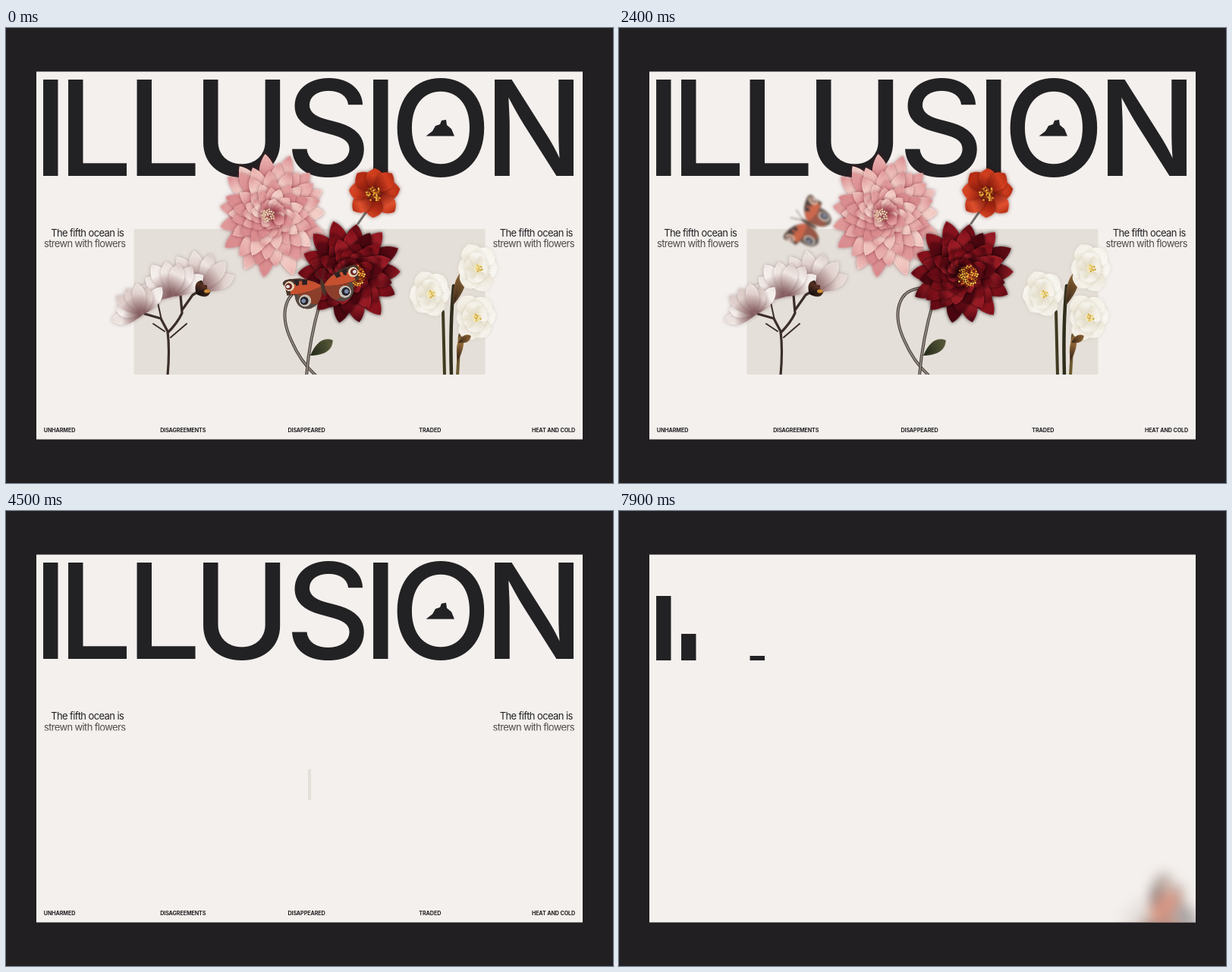
Write an HTML page with a canvas that moves like this. It is 800 px wide and 600 px high and loops after 8 s.

```html
<!DOCTYPE html>
<html lang="en">
<head>
<meta charset="utf-8">
<title>Illusion</title>
<style>
html, body { margin: 0; width: 100%; height: 100%; overflow: hidden; background: #221f22; }
canvas { display: block; }
</style>
</head>
<body>
<canvas id="stage" width="800" height="600" aria-label="ILLUSION. The fifth ocean is strewn with flowers"></canvas>
<script>
const LOOP = 8000, INK = '#222123', PAPER = '#f4f0ed', PANEL = '#e5dfd9';
const FONT = 'Inter, "Liberation Sans", sans-serif';
const ctx = document.getElementById('stage').getContext('2d');

const clamp = v => Math.min(1, Math.max(0, v));
const mix = (a, b, p) => a + (b - a) * p;
const cubic = p => p < .5 ? 4 * p ** 3 : 1 - 4 * (1 - p) ** 3;
const ease = (t, start, span) => cubic(clamp((t - start) / span));

let seed = 7;
const rand = () => (seed = seed * 16807 % 2147483647) / 2147483647;
const pick = list => list[Math.floor(rand() * list.length)];

function sprite(w, h, zoom, draw) {
  const c = document.createElement('canvas');
  c.width = w * zoom;
  c.height = h * zoom;
  const g = c.getContext('2d');
  g.scale(zoom, zoom);
  g.lineCap = g.lineJoin = 'round';
  draw(g);
  return c;
}

function shape(g, path, fill) {
  g.fillStyle = fill;
  g.fill(new Path2D(path));
}

function line(g, path, width, color) {
  g.lineWidth = width;
  g.strokeStyle = color;
  g.stroke(new Path2D(path));
}

function dot(g, x, y, rx, ry, color) {
  g.fillStyle = color;
  g.beginPath();
  g.ellipse(x, y, rx, ry, 0, 0, 7);
  g.fill();
}

// Pointed petal growing from (x, y), dark at its root, with a soft shadow below.
function petal(g, x, y, angle, len, w, { base, tips, vein, shadow }) {
  const a = len * .3, b = len * .74;
  const edge = `M0 0C${a} ${-w * .45} ${b} ${-w * .9} ${len} 0C${b} ${w * .9} ${a} ${w * .45} 0 0`;
  const shade = g.createLinearGradient(len * .15, -w / 4, len, w / 4);
  shade.addColorStop(0, base);
  shade.addColorStop(.6, pick(tips));
  shade.addColorStop(1, pick(tips));
  g.save();
  g.translate(x, y);
  g.rotate(angle);
  g.shadowColor = shadow;
  g.shadowBlur = 5;
  shape(g, edge, shade);
  g.shadowBlur = 0;
  for (let k = -2; k <= 2; k++)
    line(g, `M${a / 2} 0Q${b} ${w * k * .28} ${len * .95} ${w * k * .03}`, .6, vein);
  g.restore();
}

// Rings of petals, the outermost first.
function bloom(g, x, y, rx, ry, n, rings, w, look) {
  for (let k = 0; k < rings; k++) {
    const ring = 1 - k / (rings + .6);
    for (let i = 0; i < n; i++) {
      const a = (i + k * .5 + (rand() - .5) * .4) / n * 2 * Math.PI;
      const r = ring / Math.hypot(Math.cos(a) / rx, Math.sin(a) / ry) * mix(.9, 1.04, rand());
      petal(g, x, y, a, r, w * mix(.5, 1, ring), look);
    }
  }
}

// Half-open flower: petals spread between two angles in degrees, the middle one in front.
function fan(g, x, y, from, to, n, len, w, look) {
  const order = [...Array(n).keys()].sort((a, b) => Math.abs(b - n / 2) - Math.abs(a - n / 2));
  for (const i of order)
    petal(g, x, y, mix(from, to, i / (n - 1)) * Math.PI / 180, len * mix(.85, 1.08, rand()), w, look);
}

function stamens(g, x, y, r, n, colors) {
  for (let i = 0; i < n; i++) {
    const a = i * 2.4, d = r * Math.sqrt(i / n);
    dot(g, x + d * Math.cos(a), y + d * Math.sin(a), 1.3, 1.3, pick(colors));
  }
}

const GOLD = ['#e0a02c', '#c4701f', '#f0c850', '#8f4016', '#6b1c12'];
const PINK = { base: '#9a3f4b', tips: ['#f0bfba', '#e5a3a2', '#f5d3cc', '#dc9092'], vein: '#b0485028', shadow: '#6a182480' };
const RED = { base: '#1c0206', tips: ['#6b0c16', '#8c131d', '#4c0710', '#a01d27'], vein: '#24020840', shadow: '#0c0002c0' };
const ORANGE = { base: '#7a170d', tips: ['#d4401f', '#b92f15', '#e3522f'], vein: '#7a140c40', shadow: '#4a0a0490' };
const LEAF = { base: '#2b3020', tips: ['#4b4e30', '#676846'], vein: '#20281850', shadow: '#0000' };
const BLUSH = { base: '#8d6668', tips: ['#f1e9e5', '#e2d3cf', '#f7f2ef'], vein: '#80606020', shadow: '#60404060' };
const WHITE = { base: '#e3dcc6', tips: ['#faf8f3', '#f3efe6', '#f7f4ec'], vein: '#b0a58a20', shadow: '#8a806030' };
const HUSK = { base: '#4a3422', tips: ['#7d592f', '#9c713f'], vein: '#2c1c1040', shadow: '#0000' };
const BUD = { base: '#1e1512', tips: ['#3a241b', '#5e3526'], vein: '#0003', shadow: '#0000' };

const bouquet = sprite(800, 600, 1, g => {
  line(g, 'M384 284L400 306', 4, '#3d3230');
  line(g, 'M480 236Q472 246 464 258', 3, '#777069');
  const loop = 'M400 343C366 344 360 378 376 412Q388 440 408 458', stalk = 'M414 362Q400 410 396 458';
  for (const path of [loop, stalk]) {
    line(g, path, 4, '#4f4843');
    line(g, path, 1.5, '#9c948a');
  }
  petal(g, 401, 432, -.6, 36, 15, LEAF);
  bloom(g, 351, 246, 74, 87, 15, 6, 22, PINK);
  stamens(g, 345, 247, 9, 30, ['#d9c09a', '#a05a58', '#e8d7b6']);
  bloom(g, 486, 217, 37, 35, 8, 1, 23, ORANGE);
  stamens(g, 485, 219, 10, 60, GOLD);
  bloom(g, 452, 322, 71, 69, 14, 5, 23, RED);
  stamens(g, 460, 327, 14, 80, GOLD);
});

const magnolia = sprite(800, 600, 1, g => {
  const bark = '#3b2e29';
  line(g, 'M213 458Q216 425 213 400L204 383L183 377M213 402Q226 389 232 376L230 352M232 372L246 352L260 344', 3.2, bark);
  line(g, 'M205 385L200 362M217 408L238 390M209 400L194 390', 2, bark);
  fan(g, 257, 347, -125, -25, 5, 52, 19, BLUSH);
  fan(g, 220, 354, -168, -35, 7, 50, 20, BLUSH);
  fan(g, 180, 378, -190, -55, 7, 42, 17, BLUSH);
  fan(g, 251, 351, -70, -10, 3, 21, 10, BUD);
  dot(g, 265, 347, 4, 2.5, '#c98b36');
});

const narcissus = sprite(800, 600, 1, g => {
  line(g, 'M578 458L576 374', 4, '#3f3a20');
  line(g, 'M587 458Q585 390 590 340', 4.5, '#2f2d1b');
  line(g, 'M595 458L598 405', 4, '#6b5a30');
  petal(g, 589, 366, -1.25, 50, 13, HUSK);
  petal(g, 595, 440, -1.4, 36, 8, HUSK);
  for (const [x, y] of [[558, 350], [620, 316], [618, 381]]) {
    bloom(g, x, y, 27, 34, 6, 2, 27, WHITE);
    dot(g, x + 2, y + 1, 6, 6, '#f0e6bd');
    stamens(g, x + 3, y + 1, 5, 9, ['#e2c157', '#d0a842', '#f0dc90']);
  }
  petal(g, 596, 415, -.5, 19, 9, HUSK);
});

// One wing, hinged at (4, 30).
const wing = sprite(64, 64, 3, g => {
  const eye = (x, y, r, colors) => colors.forEach((c, i) => dot(g, x + i, y, r * (1 - i * .32), r * (1 - i * .32), c));
  shape(g, 'M4 30Q34 25 42 34Q44 54 26 56Q8 54 4 30', '#574a43');
  shape(g, 'M4 30Q28 24 37 33Q34 48 16 52Q7 46 4 30', '#8b3f2b');
  eye(30, 44, 8, ['#c5beb5', '#26242b', '#7d8aa8']);
  const upper = 'M4 30Q18 14 43 12Q53 11 54 16Q51 23 52 32Q32 37 4 30';
  shape(g, upper, '#4a342c');
  shape(g, 'M4 30Q14 20 24 18Q44 16 47 32Q28 36 4 30', '#c6502f');
  shape(g, 'M21 18L28 16L29 23L23 24M32 15L39 14L37 23L33 22', '#2c2224');
  eye(46, 21, 6.5, ['#e3d1b4', '#702b28', '#dfe0e0']);
});

// Way points of the flight, one every 450 ms from the take-off.
const TAKE_OFF = 1050, STEP = 450;
const ROUTE = [[417, 338], [426, 308], [272, 258], [247, 256], [120, 262], [-40, 320]];

function along(points, u) {
  const i = Math.min(Math.floor(u), points.length - 2), p = u - i;
  const at = k => points[Math.min(points.length - 1, Math.max(0, k))];
  return [0, 1].map(c => {
    const [a, b, d, e] = [-1, 0, 1, 2].map(k => at(i + k)[c]);
    return b + p / 2 * (d - a + p * (2 * a - 5 * b + 4 * d - e + p * (3 * (b - d) + e - a)));
  });
}

function butterfly(t) {
  const flap = .68 - .28 * Math.sin(t * Math.PI / 100);
  const u = Math.max(0, (t - TAKE_OFF) / STEP), aloft = clamp(u * 1.5);
  if (u <= ROUTE.length - 1)
    insect(along(ROUTE, u), -.22 - .8 * clamp(u / 3), 1, mix(1, flap, aloft), 1.7 * aloft, 1 - .15 * aloft);
  const p = (t - 7700) / 300;
  if (p > 0) insect([mix(820, 640, p), mix(660, 490, p)], -.9, 1.9, flap, 8, .55);
}

function insect([x, y], turn, size, flap, blur, alpha) {
  ctx.save();
  ctx.translate(x, y);
  ctx.rotate(turn);
  ctx.scale(size, size);
  ctx.globalAlpha = alpha;
  if (blur) ctx.filter = `blur(${blur}px)`;
  for (const side of [1, -1]) {
    ctx.save();
    ctx.scale(side * flap, 1);
    ctx.drawImage(wing, -3, -28, 64, 64);
    ctx.restore();
  }
  dot(ctx, 0, 4, 2.6, 12, '#4a3429');
  line(ctx, 'M-1 -7L-6 -21M1 -7L7 -20', .8, '#40332e');
  ctx.restore();
}

function masked(x, y, w, h, draw) {
  ctx.save();
  ctx.beginPath();
  ctx.rect(x, y, w, h);
  ctx.clip();
  draw();
  ctx.restore();
}

// Sinks and fades a plant towards its root.
function plant(img, t, root, start, sway = 0) {
  const p = clamp((t - start) / 1200), s = cubic(p), size = 1 - .35 * s;
  ctx.save();
  ctx.globalAlpha = 1 - clamp((p - .545) / .19);
  ctx.translate(root, 457 + 67 * s);
  ctx.scale(size, size);
  ctx.translate(-root, -457);
  ctx.translate(390, 290 + 6 * sway);
  ctx.rotate(.043 * sway);
  ctx.drawImage(img, -390, -290);
  ctx.restore();
}

function text(str, x, y, font, color, spacing) {
  ctx.font = `${font} ${FONT}`;
  ctx.fillStyle = color;
  ctx.textAlign = 'center';
  ctx.letterSpacing = spacing + 'px';
  ctx.fillText(str, x, y);
}

const TITLE_X = [59, 121, 211.5, 311, 424.5, 494, 573, 696];
const titleDrop = (t, i) => 135 * (t < 7050
  ? ease(t, 5800 - 172 * i, 1300)
  : 1 - ease(t, 7334 + 143 * i, 1000));

function title(t) {
  masked(40, 57, 720, 140, () => {
    [...'ILLUSION'].forEach((ch, i) => {
      ctx.font = `500 174.6px ${FONT}`;
      ctx.textAlign = 'left';
      ctx.letterSpacing = '0px';
      const m = ctx.measureText(ch);
      const x = TITLE_X[i] - (m.actualBoundingBoxRight - m.actualBoundingBoxLeft) / 2;
      ctx.fillStyle = INK;
      ctx.fillText(ch, x, 195 + titleDrop(t, i));
    });
    if (t > 7000) return;
    ctx.translate(0, titleDrop(t, 6));
    shape(ctx, 'M553.5 142.5L562 136L566 129L572 127L574 122L580 121L581 128L587 133L591 142.5Z', INK);
  });
}

function captions(t) {
  const first = 16 * ease(t, 4340, 1000), second = 16 * ease(t, 4200, 1000);
  for (const x of [0, 591.5]) {
    masked(45 + x, 262, 118, 14.5, () =>
      text('The fifth ocean is', 107.2 + x, 274.5 + first, '400 13px', INK, -.6));
    masked(45 + x, 276.5, 118, 13, () =>
      text('strewn with flowers', 103.7 + x, 288.5 + second, '400 13px', '#504c4b', -.65));
  }
}

const LABELS = ['UNHARMED', 'DISAGREEMENTS', 'DISAPPEARED', 'TRADED', 'HEAT AND COLD'];

function labels(t) {
  masked(40, 525, 720, 9, () => LABELS.forEach((str, i) =>
    text(str, 70.5 + 162.75 * i, 532.5 + 10 * ease(t, 4960 - 90 * i, 1000), '700 7.2px', INK, -.12)));
}

function panel(t) {
  const w = 463 * (1 - ease(t, 3500, 1150)), h = 192 * (1 - ease(t, 3690, 1300));
  if (w < .3) return;
  ctx.fillStyle = PANEL;
  ctx.fillRect(400 - w / 2, 361 - h / 2, w, h);
}

function draw(t) {
  ctx.fillStyle = '#221f22';
  ctx.fillRect(0, 0, 800, 600);
  masked(40, 57.5, 720, 485, () => {
    ctx.fillStyle = PAPER;
    ctx.fillRect(40, 57, 720, 487);
    title(t);
    if (t < 6200) {
      panel(t);
      captions(t);
      labels(t);
    }
    if (t < 3700) {
      const sway = ease(t, 900, 500) - ease(t, 1400, 1000);
      masked(40, 57, 720, 400, () => {
        plant(narcissus, t, 588, 2460);
        plant(bouquet, t, 409, 2570, sway);
        plant(magnolia, t, 216, 2680);
      });
    }
    butterfly(t);
  });
}

const begin = performance.now();
function tick() {
  draw((performance.now() - begin) % LOOP);
  requestAnimationFrame(tick);
}
tick();
</script>
</body>
</html>
```
